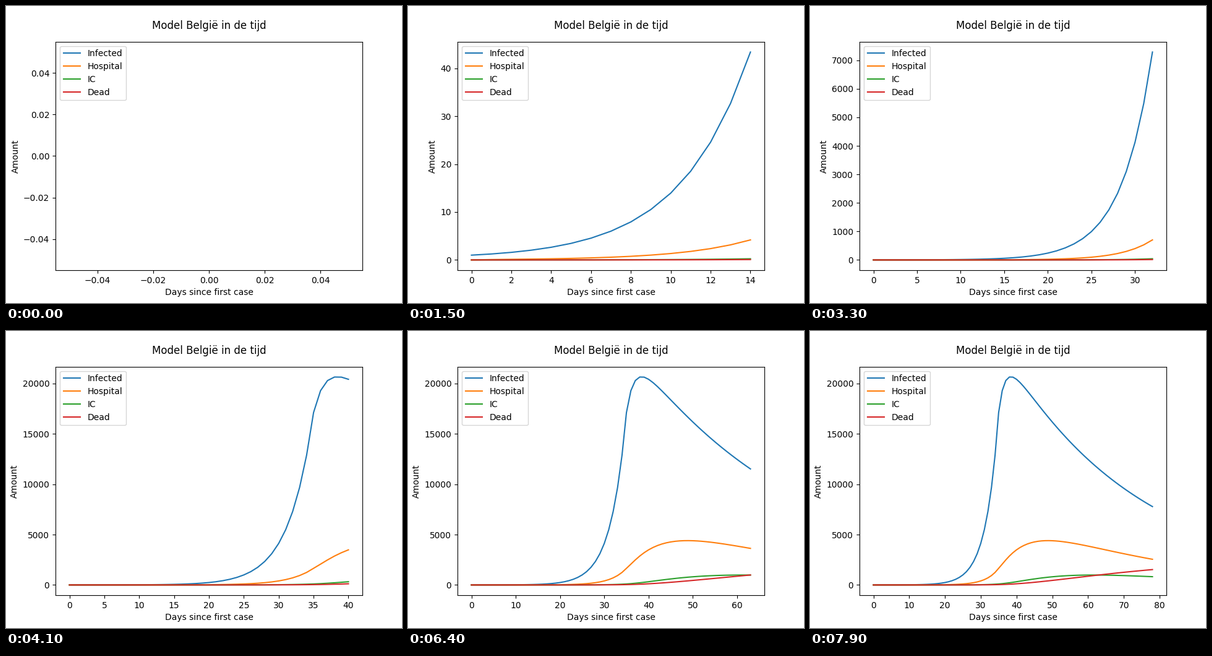
A matplotlib script that plays this animation: 640 by 480 pixels, repeating every 8000 ms.

```python
import numpy as np
import matplotlib.pyplot as plt
from matplotlib.animation import FuncAnimation

FRAMES = 80
LOCKDOWN = 35
GROWTH = 1.3294
DECAY = np.exp(-0.02617)


def simulate(n):
    """Daily infected, hospital, IC and dead, with measures from LOCKDOWN on."""
    t = np.arange(n)
    s = np.maximum(t - LOCKDOWN, 0)
    before = t <= LOCKDOWN
    infected = np.where(
        before,
        0.805 * GROWTH**t + 0.195 * 0.9**t,
        23975 * DECAY**s - 3400 * 0.5**s - 3470 * 0.68**s,
    )
    hospital = np.where(
        before,
        0.0776 * (GROWTH**t - 0.3**t),
        7937 * DECAY**s - 6600 * 0.88**s + 314 * 0.45**s,
    )
    ic = np.zeros(n)
    dead = np.zeros(n)
    for i in range(n - 1):
        ic[i + 1] = ic[i] + 0.025 * hospital[i] - 0.0962 * ic[i]
        dead[i + 1] = dead[i] + 0.0052 * hospital[i] + 0.0215 * ic[i]
    return t, {"Infected": infected, "Hospital": hospital, "IC": ic, "Dead": dead}


days, series = simulate(FRAMES)
fig, ax = plt.subplots(figsize=(6.4, 4.8), dpi=100)


def draw(n):
    ax.clear()
    for name, values in series.items():
        ax.plot(days[:n], values[:n], label=name)
    ax.set_title("Model België in de tijd", pad=15)
    ax.set_xlabel("Days since first case")
    ax.set_ylabel("Amount")
    ax.legend(loc="upper left")


anim = FuncAnimation(fig, draw, frames=FRAMES, interval=100, repeat=True, repeat_delay=0)
plt.show()
```
